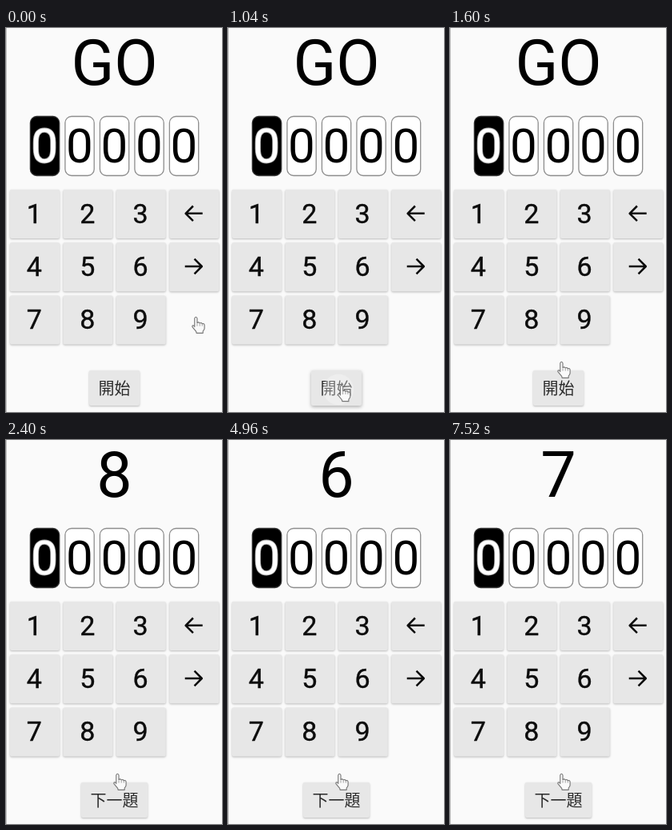
Recreate the animation shown at these times as an HTML page with a canvas. Size 270 by 480 pixels, loop 8 s.

```html
<!DOCTYPE html>
<html lang="zh-Hant">
<head>
<meta charset="utf-8">
<title>Number quiz</title>
<style>
html, body { margin: 0; width: 100%; height: 100%; overflow: hidden; background: #fafafa; }
canvas { display: block; width: 270px; height: 480px; filter: blur(0.45px); }
</style>
</head>
<body>
<canvas id="stage"></canvas>
<script>
const W = 270, H = 480, LOOP = 8000, STEP = 80;
const LATIN = 'Roboto, sans-serif';
const CJK = '"Noto Sans CJK TC", "Noto Sans CJK JP", "Noto Sans CJK", sans-serif';
const TITLES = [[0, 'GO'], [2400, '8'], [3600, '3'], [4960, '6'], [6240, '5'], [7520, '7']];

const canvas = document.getElementById('stage');
const ctx = canvas.getContext('2d');
const dpr = window.devicePixelRatio || 1;
canvas.width = W * dpr;
canvas.height = H * dpr;
ctx.scale(dpr, dpr);
ctx.lineJoin = 'round';

const clamp = v => Math.max(0, Math.min(1, v));
const ramp = (t, a, b) => clamp((t - a) / (b - a));
const ease = p => p * p * (3 - 2 * p);
const mix = (a, b, p) => a + (b - a) * p;

// An outline of the given width makes the strokes a little heavier.
function text(str, x, y, font, color, outline = 0, outlineColor = color) {
  ctx.font = font;
  ctx.textAlign = 'center';
  if (outline) {
    ctx.strokeStyle = outlineColor;
    ctx.lineWidth = outline;
    ctx.strokeText(str, x, y);
  }
  ctx.fillStyle = color;
  ctx.fillText(str, x, y);
}

function roundBox(x, y, w, h, r) {
  ctx.beginPath();
  ctx.roundRect(x, y, w, h, r);
}

function button(x, y, w, h, lift = 0) {
  ctx.save();
  ctx.shadowColor = `rgba(0,0,0,${0.26 + 0.04 * lift})`;
  ctx.shadowBlur = (2.5 + 1.5 * lift) * dpr;
  ctx.shadowOffsetY = (1 + 0.7 * lift) * dpr;
  ctx.fillStyle = '#e7e7e7';
  roundBox(x, y, w, h, 2);
  ctx.fill();
  ctx.restore();
}

function arrow(x, y, dir) {
  ctx.strokeStyle = '#0c0c0c';
  ctx.lineWidth = 2.5;
  ctx.beginPath();
  ctx.moveTo(x - 11 * dir, y);
  ctx.lineTo(x + 10 * dir, y);
  ctx.moveTo(x + 0.8 * dir, y - 9.3);
  ctx.lineTo(x + 10.1 * dir, y);
  ctx.lineTo(x + 0.8 * dir, y + 9.3);
  ctx.stroke();
}

function answerBoxes() {
  const font = '60px ' + LATIN;
  for (let i = 0; i < 5; i++) {
    const x = 30 + i * 43.5, active = i === 0;
    roundBox(x + 0.4, 110.5, 36.3, 74, 8);
    ctx.fillStyle = active ? '#000' : '#fff';
    ctx.fill();
    ctx.strokeStyle = active ? '#333' : '#8d8d8d';
    ctx.lineWidth = 1.3;
    ctx.stroke();
    if (active) text('0', x + 18.2, 167.6, font, '#fff', 1.8, '#aaa');
    else text('0', x + 18.4, 167.6, font, '#000');
  }
}

function keypad() {
  for (let row = 0; row < 3; row++) {
    for (let col = 0; col < 4; col++) {
      if (row === 2 && col === 3) continue;
      const x = 5 + col * 66.4, y = 202 + row * 66.2;
      button(x, y, 62, 61);
      if (col < 3) text(row * 3 + col + 1, x + 30.3, y + 42, '34px ' + LATIN, '#0c0c0c', 0.4);
      else arrow(x + 30.5, y + 29.8, row ? 1 : -1);
    }
  }
}

function actionButton(t) {
  const started = t >= 2400;
  const w = started ? 83 : 63, x = started ? 94 : 104, y = 428, h = 44;
  const lift = ramp(t, 880, 1040) * (1 - ramp(t, 1120, 1520));
  button(x, y, w, h, lift);
  text(started ? '下一題' : '開始', x + w / 2, 457.8, '20px ' + CJK, '#2b2b2b');
  if (lift > 0) {
    ctx.save();
    roundBox(x, y, w, h, 2);
    ctx.clip();
    ctx.fillStyle = `rgba(248,248,248,${0.35 * lift})`;
    ctx.beginPath();
    ctx.arc(138, 452, 8 + 28 * ramp(t, 880, 1280), 0, 7);
    ctx.fill();
    ctx.restore();
  }
}

function hand(t) {
  const go = ease(ramp(t, 240, 1060)), back = ease(ramp(t, 1120, 1600));
  const x = mix(mix(231, 135.5, go), 133, back);
  const y = mix(mix(360, 445.5, go), 416, back);
  ctx.save();
  ctx.translate(x, y);
  ctx.scale(0.95, 0.97);
  ctx.beginPath();
  ctx.moveTo(5, 14);
  ctx.lineTo(5, 3);
  ctx.quadraticCurveTo(6.7, -0.5, 8.4, 3);
  ctx.lineTo(8.4, 9);
  ctx.quadraticCurveTo(10.5, 7, 11.8, 9.3);
  ctx.quadraticCurveTo(14, 8, 15, 10);
  ctx.quadraticCurveTo(17.8, 9.2, 18, 12);
  ctx.lineTo(18, 16);
  ctx.quadraticCurveTo(17.5, 18, 16, 19.5);
  ctx.lineTo(16, 22);
  ctx.lineTo(7.5, 22);
  ctx.lineTo(7, 20);
  ctx.lineTo(2, 14);
  ctx.quadraticCurveTo(1.6, 11, 5, 13);
  ctx.closePath();
  ctx.fillStyle = '#fafafa';
  ctx.fill();
  ctx.strokeStyle = '#777';
  ctx.lineWidth = 1.2;
  ctx.stroke();
  ctx.lineWidth = 0.7;
  ctx.beginPath();
  for (const fx of [8.4, 11.8, 15]) {
    ctx.moveTo(fx, 10);
    ctx.lineTo(fx, 13);
  }
  ctx.stroke();
  ctx.restore();
}

function draw(now) {
  const t = Math.floor((now % LOOP) / STEP) * STEP;
  ctx.fillStyle = '#fafafa';
  ctx.fillRect(0, 0, W, H);
  ctx.fillStyle = '#c2c2c2';
  ctx.fillRect(0, 0, 1, H);
  const title = TITLES.filter(([start]) => t >= start).pop()[1];
  text(title, 135.5, 71.3, '79px ' + LATIN, '#000');
  answerBoxes();
  keypad();
  actionButton(t);
  hand(t);
}

const origin = performance.now();
function tick() {
  draw(performance.now() - origin);
  requestAnimationFrame(tick);
}
tick();
</script>
</body>
</html>
```
